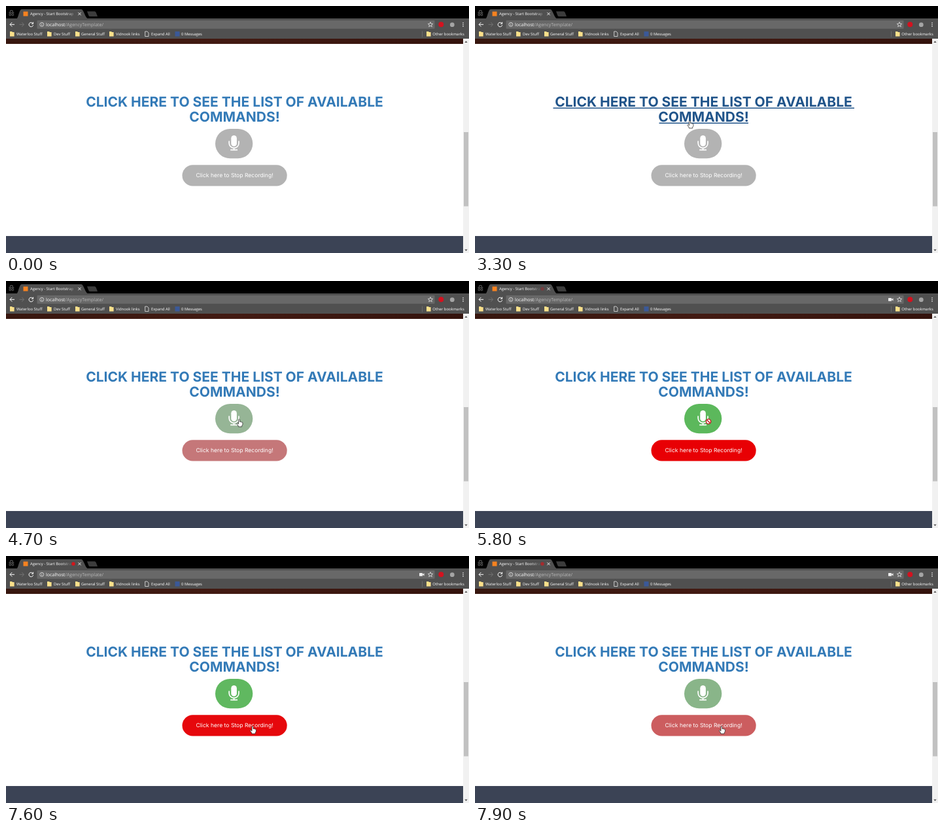
Write an HTML page that moves like this. It is 708x378 px and loops after 8000 ms.

```html
<!DOCTYPE html>
<html lang="en">
<head>
<meta charset="utf-8">
<title>Voice commands</title>
<style>
html, body { margin: 0; width: 100%; height: 100%; overflow: hidden; background: #fff; }
svg { display: block; width: 708px; height: 378px; }
text { text-rendering: geometricPrecision; font-optical-sizing: none; white-space: pre; }
.ui { font: 5.9px "Open Sans", "Noto Sans", sans-serif; fill: #fff; }
.url { font-size: 7px; }
.head { font: 700 21px Inter, sans-serif; text-anchor: middle; }
.btn { font: 400 8.6px Inter, sans-serif; text-anchor: middle; fill: #fff; }
.line { fill: none; stroke: #e8e8e8; stroke-width: 1; }
</style>
</head>
<body>
<svg viewBox="0 0 708 378" xmlns="http://www.w3.org/2000/svg">
  <defs>
    <linearGradient id="strip">
      <stop offset="0" stop-color="#38170f"/>
      <stop offset=".5" stop-color="#431b13"/>
      <stop offset="1" stop-color="#34130d"/>
    </linearGradient>
    <linearGradient id="fade" gradientUnits="userSpaceOnUse" x1="94" x2="106">
      <stop id="fadeFrom" offset="0" stop-color="#fff"/>
      <stop offset="1" stop-color="#fff" stop-opacity="0"/>
    </linearGradient>
    <clipPath id="tabClip"><rect id="tabRoom" x="36" y="4" width="69" height="15"/></clipPath>
    <path id="folder" d="M0 0H3L4 1H6.6V7.5H0Z" fill="#fbe08a"/>
  </defs>

  <!-- page -->
  <rect width="708" height="378" fill="#fff"/>
  <rect y="50" width="699" height="8" fill="url(#strip)"/>
  <rect y="352" width="699" height="26" fill="#3b4355"/>
  <rect x="699" y="50" width="9" height="328" fill="#f1f1f1"/>
  <rect x="700" y="193" width="7" height="113.5" fill="#c1c1c1"/>
  <path d="M701.3 56L703.5 53.5L705.7 56ZM701.3 372.5L703.5 375L705.7 372.5Z" fill="#505050"/>

  <!-- browser bar -->
  <rect width="708" height="19" fill="#000"/>
  <rect y="19" width="708" height="31" fill="#505050"/>
  <path d="M16 19.5C19 19 20 5 24 5H115C119 5 121 19 126 19.5Z" fill="#505050"/>
  <path d="M124 8.3H135.5Q137 8.3 137.7 10L140 16H128.500Q127 16 126.300 14.400Z" fill="#3c3c3c"/>
  <g fill="none" stroke="#777" stroke-width=".9">
    <path d="M6 9.500L6.600 7H10L10.600 9.500M4.300 10.400H12.300"/>
    <circle cx="6.300" cy="13.300" r="1.400"/><circle cx="10.300" cy="13.300" r="1.400"/>
  </g>
  <rect x="26.500" y="8.500" width="7" height="7" fill="#f58220"/>
  <g clip-path="url(#tabClip)"><text class="ui" x="37" y="14.200" style="fill:url(#fade)">Agency - Start Bootstrap</text></g>
  <circle id="dot" cx="103" cy="12" r="2.700" fill="#d5151b"/>
  <path class="line" d="M110.300 9.800L114.700 14.200M114.700 9.800L110.300 14.200"/>

  <path class="line" d="M6 28.300H13M9.300 25L6 28.300L9.300 31.600" style="stroke:#fff"/>
  <path class="line" d="M20.500 28.300H27.500M24.200 25L27.500 28.300L24.200 31.600" style="stroke:#747474"/>
  <path class="line" d="M41 26.500A3.300 3.300 0 1 0 41.600 29.200M41.600 24.600V27.200H39" style="stroke:#fff"/>
  <rect x="47.500" y="22" width="608" height="12.800" rx="1" fill="#686868"/>
  <circle class="line" cx="54.800" cy="28.300" r="3" style="stroke-width:.8"/>
  <path class="line" d="M54.800 27.800V30.200M54.800 26.300V27" style="stroke-width:.8"/>
  <text class="ui url" x="61" y="30.900">localhost<tspan fill="#b9b9b9">/AgencyTemplate/</tspan></text>
  <g id="cam" fill="#eee"><rect x="632" y="26" width="5" height="4.800" rx=".5"/><path d="M637 28L639.500 26.300V30.500L637 28.800Z"/></g>
  <path id="star" class="line" style="stroke-width:.8"/>
  <circle cx="665.300" cy="28.300" r="4" fill="#d3121f"/>
  <circle cx="682.300" cy="28.700" r="3.400" fill="#a5a5a5"/>
  <g fill="#eee"><circle cx="699" cy="25.700" r=".8"/><circle cx="699" cy="28.300" r=".8"/><circle cx="699" cy="30.900" r=".8"/></g>
  <g id="marks"></g>
  <path class="line" d="M212.700 39H216L218 41V46.500H212.700Z" style="stroke-width:.8"/>
  <rect x="258.500" y="39" width="7" height="7.500" fill="#3b5998"/>
  <path d="M636.500 38.500V47.500" stroke="#6c6c6c"/>

  <!-- content -->
  <g id="head">
    <text class="head" x="349.500" y="154">CLICK HERE TO SEE THE LIST OF AVAILABLE</text>
    <text class="head" x="349.500" y="177">COMMANDS!</text>
    <path id="under" d="M119.500 155.500H580V157H119.500ZM281.500 178.500H418V180H281.500Z"/>
  </g>
  <rect id="mic" x="320" y="188" width="57.300" height="45.300" rx="22.600"/>
  <g fill="none" stroke="#fff">
    <path d="M348.600 202.300V210.500" stroke-width="8.600" stroke-linecap="round"/>
    <path d="M341.200 206.500V210A7.400 7.400 0 0 0 356 210V206.500M348.600 217V220" stroke-width="1.700"/>
    <path d="M343.200 220.300H354" stroke-width="1.800"/>
  </g>
  <rect id="stop" x="269.500" y="243.300" width="160.200" height="32.200" rx="16.100"/>
  <text class="btn" x="349.600" y="262">Click here to Stop Recording!</text>

  <!-- pointers, origin at the hot spot -->
  <g id="hand" fill="#fff" stroke="#222" stroke-width=".75" stroke-linejoin="round">
    <path d="M-1 .6Q0 -.7 1 .6V4Q2 3.300 2.700 4.300Q3.700 3.700 4.200 4.700Q5.300 4.300 5.400 5.600V8L4.200 10.200V11.500H-1.200V10.500L-3.600 6.900Q-3.300 5.600 -2.200 6.200L-1 7.300Z"/>
  </g>
  <path id="arrow" d="M0 0V9.300L2.200 7.300L3.700 10.700L5 10.100L3.600 6.800H6.600Z" fill="#fff" stroke="#222" stroke-width=".7"/>
  <g id="ban" fill="#fff" stroke="#c4141c" stroke-width="1.400">
    <circle cx=".5" cy="3.500" r="3.600"/><path d="M-2 1L3 6"/>
  </g>
</svg>
<script>
const LOOP = 8000, STEP = 100;
const $ = id => document.getElementById(id);
const show = (id, on) => $(id).setAttribute("visibility", on ? "visible" : "hidden");
const clamp = v => Math.min(1, Math.max(0, v));
const ease = v => v * v * (3 - 2 * v);
const mix = (a, b, p) => `rgb(${a.map((v, i) => Math.round(v + (b[i] - v) * p))})`;
const GREY = [179, 179, 179], GREEN = [92, 184, 92], RED = [232, 0, 4];

// pointer stops: time, x, y
const path = [
  [3300, 328.5, 175.5], [3400, 336, 208], [3500, 345, 235], [3600, 352, 236.5],
  [3700, 355, 226], [3900, 356.5, 211.5], [6000, 356.5, 211.5], [6800, 377, 260.5]
];

function pointer(t) {
  const i = path.findIndex(p => p[0] > t);
  if (i < 0) return path[path.length - 1].slice(1);
  const [a, b] = [path[i - 1], path[i]];
  const p = ease((t - a[0]) / (b[0] - a[0]));
  return [a[1] + (b[1] - a[1]) * p, a[2] + (b[2] - a[2]) * p];
}

function buildMarks() {
  const items = [
    [6, "Waterloo Stuff", 16], [63, "Dev Stuff", 73], [106, "General Stuff", 115],
    [158, "Vidnook links", 168], [0, "Expand All", 222], [0, "0 Messages", 268],
    [643, "Other bookmarks", 652.3]
  ];
  $("marks").innerHTML = items.map(([icon, label, x]) =>
    (icon ? `<use href="#folder" x="${icon}" y="39"/>` : "") +
    `<text class="ui" x="${x}" y="45">${label}</text>`).join("");
  const tips = Array.from({ length: 10 }, (_, i) => {
    const r = i % 2 ? 1.7 : 3.9, a = (i * 36 - 90) * Math.PI / 180;
    return (649 + r * Math.cos(a)).toFixed(2) + " " + (28.5 + r * Math.sin(a)).toFixed(2);
  });
  $("star").setAttribute("d", "M" + tips.join("L") + "Z");
}

function draw(t) {
  const hover = t >= 3300 && t < 3400;
  $("head").setAttribute("fill", hover ? "#20548a" : "#337ab7");
  show("under", hover);

  const on = clamp((t - 4600) / 300) * (1 - 0.52 * Math.pow(clamp((t - 7500) / 400), 1.8));
  $("mic").setAttribute("fill", mix(GREY, GREEN, on));
  $("stop").setAttribute("fill", mix(GREY, RED, on));

  const live = t >= 4800;
  show("cam", live);
  show("dot", live);
  $("dot").setAttribute("opacity", 0.6 + 0.4 * Math.cos((t - 5000) / 1300 * 2 * Math.PI));
  $("tabRoom").setAttribute("width", live ? 64 : 69);
  $("fade").setAttribute("x1", live ? 86 : 94);
  $("fade").setAttribute("x2", live ? 101 : 107);

  const seen = t >= 3300;
  const [x, y] = seen ? pointer(t) : [0, 0];
  const onMic = y >= 188 && y < 233;
  const banned = seen && t >= 5100 && onMic;
  const onLink = y < 180 || onMic || y >= 243.5;
  show("ban", banned);
  show("hand", seen && !banned && onLink);
  show("arrow", seen && !onLink);
  for (const id of ["hand", "arrow", "ban"])
    $(id).setAttribute("transform", `translate(${x.toFixed(2)} ${y.toFixed(2)})`);
}

function tick() {
  const t = performance.now() % LOOP;
  draw(Math.floor(t / STEP) * STEP);
  requestAnimationFrame(tick);
}

buildMarks();
tick();
</script>
</body>
</html>
```
